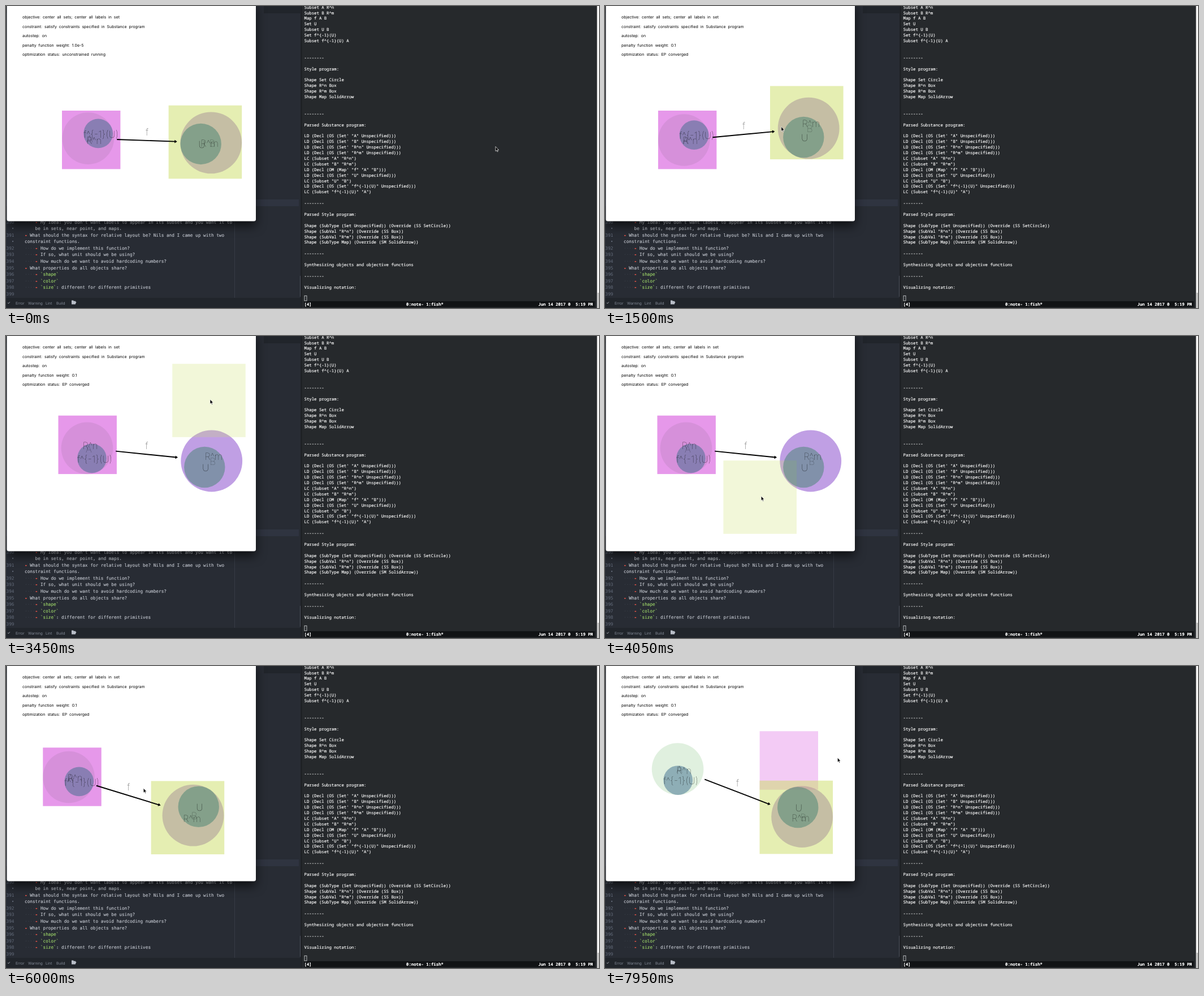
Recreate the animation shown at these times as an HTML page. Size 1049 by 534 pixels, loop 8 s.

```html
<!DOCTYPE html>
<html lang="en">
<head>
<meta charset="utf-8">
<title>Set diagram optimizer</title>
<style>
html, body { margin: 0; width: 100%; height: 100%; overflow: hidden; background: #282c34; }
svg { display: block; width: 1049px; height: 534px; }
text { white-space: pre; text-rendering: geometricPrecision; }
.term { font: 500 7.33px "Noto Sans Mono", monospace; fill: #fff; stroke: #fff; stroke-width: .15; }
.bar { font-weight: 700; }
.code { font: 7.72px "DejaVu Sans Mono", monospace; fill: #c6cad2; stroke: #c6cad2; stroke-width: .12; }
.num { fill: #656d7c; stroke: none; }
.dash { fill: #f0574a; stroke: #f0574a; stroke-width: .7; }
.str { fill: #9fd86a; stroke: #9fd86a; }
.dim { fill: #3d434f; stroke: none; }
.ui { font: 6.6px Inter, sans-serif; fill: #868d9a; }
.info { font: 400 7px Inter, sans-serif; word-spacing: 2px; fill: #000; }
.label { font: 100 17px Inter, sans-serif; fill: #000; text-anchor: middle; }
</style>
</head>
<body>
<svg id="stage" viewBox="0 0 1049 534">
  <defs>
    <clipPath id="inside"><rect x="1.5" y="-8" width="440.5" height="388.5" rx="3.5"/></clipPath>
  </defs>
  <g id="editor"></g>
  <g id="terminal"></g>
  <rect x="1.5" y="-8" width="440.5" height="388.5" rx="3.5" fill="#fff" style="filter:drop-shadow(0 8px 9px rgba(0,0,0,.65))"/>
  <g id="scene" clip-path="url(#inside)"></g>
  <g id="top"></g>
</svg>
<script>
const LOOP = 8000, STEP = 150;
const $ = id => document.getElementById(id);

function set(el, attrs) {
  for (const k in attrs) el.setAttribute(k, attrs[k]);
}
function add(parent, tag, attrs, content) {
  const el = document.createElementNS('http://www.w3.org/2000/svg', tag);
  set(el, attrs);
  if (content !== undefined) el.textContent = content;
  return parent.appendChild(el);
}
const rect = (g, x, y, width, height, fill) => add(g, 'rect', { x, y, width, height, fill });
const write = (g, cls, x, y, s) => add(g, 'text', { class: cls, x, y }, s);

function buildEditor(g) {
  rect(g, 0, 0, 524, 534, '#282c34');
  rect(g, 0, 0, 521, 13, '#21252b');
  rect(g, 442, 0, 14, 13, '#282c34');
  rect(g, 0, 342, 518, 12, '#2f3440');
  rect(g, 404, 354, 1, 162, '#363b45');
  rect(g, 520, 477, 2, 37, '#4b505b');
  const col = 4.646, left = 33;
  // Leading spaces give the indent; lines without a dash are wrapped.
  const lines = [
    "    - My idea: you don't want labels to appear in its subset and you want it to",
    '    be in sets, near point, and maps.',
    '- What should the syntax for relative layout be? Nils and I came up with two',
    'constraint functions.',
    '    - How do we implement this function?',
    '    - If so, what unit should we be using?',
    '    - How much do we want to avoid hardcoding numbers?',
    '- What properties do all objects share?',
    '    - `shape`',
    '    - `color`',
    '    - `size`: different for different primitives',
    ''
  ];
  let number = 390;
  lines.forEach((line, i) => {
    const [, indent, dash, body] = line.match(/^( *)(- )?(.*)$/);
    const y = 384.6 + i * 11.57, x = left + indent.length * col;
    const gutter = dash || !line ? number++ : '•';
    set(write(g, 'code num', 14.5, y, gutter), { 'text-anchor': 'end' });
    if (dash) {
      write(g, 'code dim', left, y, '·'.repeat(indent.length));
      write(g, 'code dash', x, y, '-');
    }
    const row = write(g, 'code', x + (dash ? 2 * col : 0), y, '');
    body.split(/(`\w+`)/).forEach(part =>
      add(row, 'tspan', part[0] === '`' ? { class: 'str' } : {}, part));
  });
  rect(g, 0, 516, 524, 18, '#21252b');
  set(write(g, 'ui', 2, 527, '✓'), { style: 'fill:#c8ccd4' });
  [['Error', 17], ['Warning', 39], ['Lint', 70], ['Build', 89]].forEach(([s, x]) => write(g, 'ui', x, 527.5, s));
  add(g, 'path', { d: 'M116 527.5V520.5h3l1 1.2h3v1.3h1.5l-1.8 4.5z', fill: '#b9bec8' });
}

function buildTerminal(g) {
  rect(g, 521, 0, 528, 534, '#26292c');
  rect(g, 521.5, 0, 2, 534, '#1c1f22');
  rect(g, 1045.5, 0, 3.5, 534, '#f8f8f8');
  rect(g, 1046.3, 507, 2.7, 27, '#c1c1c1');
  const rule = '--------';
  const rows = [
    'Subset A R^n', 'Subset B R^m', 'Map f A B', 'Set U', 'Subset U B', 'Set f^{-1}(U)', 'Subset f^{-1}(U) A',
    '', '', rule, '', 'Style program:', '',
    'Shape Set Circle', 'Shape R^n Box', 'Shape R^m Box', 'Shape Map SolidArrow',
    '', '', rule, '', 'Parsed Substance program:', '',
    ...['A', 'B', 'R^n', 'R^m'].map(s => `LD (Decl (OS (Set' "${s}" Unspecified)))`),
    'LC (Subset "A" "R^n")', 'LC (Subset "B" "R^m")',
    'LD (Decl (OM (Map\' "f" "A" "B")))', 'LD (Decl (OS (Set\' "U" Unspecified)))',
    'LC (Subset "U" "B")', 'LD (Decl (OS (Set\' "f^{-1}(U)" Unspecified)))', 'LC (Subset "f^{-1}(U)" "A")',
    '', rule, '', 'Parsed Style program:', '',
    'Shape (SubType (Set Unspecified)) (Override (SS SetCircle))',
    'Shape (SubVal "R^n") (Override (SS Box))', 'Shape (SubVal "R^m") (Override (SS Box))',
    'Shape (SubType Map) (Override (SM SolidArrow))',
    '', rule, '', 'Synthesizing objects and objective functions', '', rule, '', 'Visualizing notation:'
  ];
  const rowY = n => 4.6 + n * 9.9;
  rows.forEach((s, i) => write(g, 'term', 527.5, rowY(i), s));
  rect(g, 527.5, 522, 514, 10.5, '#111315');
  add(g, 'rect', { x: 528, y: 512.3, width: 4, height: 9, fill: 'none', stroke: '#d8dadb', 'stroke-width': .8 });
  [['[4]', 527.5], ['0:note- 1:fish*', 708], ['Jun 14 2017 0  5:19 PM', 941.5]]
    .forEach(([s, x]) => write(g, 'term bar', x, rowY(53) + .2, s));
}

const size = { A: 45.8, B: 54.4, F: 25.9, U: 36.2, n: 103.4, m: 129.6 };
const mix = (p, q, k) => p.map((v, i) => v + (q[i] - v) * k);
const polar = ([x, y], r, a) => [x + r * Math.cos(a), y + r * Math.sin(a)];
const heading = (p, q) => Math.atan2(q[1] - p[1], q[0] - p[0]);
const shift = (p, x, y) => [p[0] + x, p[1] + y];

// Layouts the optimizer settles in: when it moves, the box centres,
// and the direction (degrees) in which each outer set leans in its box.
const layouts = [
  { move: [0, 0], n: [150.7, 236.7], m: [352.4, 240.6], lean: [205, 7] },
  { move: [1350, 1500], n: [145.7, 236.7], m: [356.8, 206.3], lean: [177, 71] },
  { move: [2850, 3000], n: [144.2, 192.4], m: [359.5, 211.5], lean: [97, 66] },
  { move: [4050, 4500], n: [141.5, 194.2], m: [347, 233.5], lean: [146, -12] },
  { move: [5400, 5700], n: [117, 196], m: [321.4, 268.2], lean: [175, -23] },
  { move: [6900, 7800], n: [134.5, 183.2], m: [338.3, 267.5], lean: [190, -5] }
];

// An inner set stays put until its outer set drags it along.
function keepInside(inner, outer, room) {
  return Math.hypot(inner[0] - outer[0], inner[1] - outer[1]) <= room
    ? inner : polar(outer, room, heading(outer, inner));
}
let F = [164, 225], U = [344, 244];
for (const p of layouts) {
  const [a, b] = p.lean.map(d => d * Math.PI / 180);
  p.A = polar(p.n, 6, a);
  p.B = polar(p.m, 10.4, b);
  p.F = F = keepInside(F, p.A, size.A - size.F);
  p.U = U = keepInside(U, p.B, size.B - size.U);
}
function settled(name, t) {
  let i = layouts.length - 1;
  while (i && t < layouts[i].move[0]) i--;
  if (!i) return layouts[0][name];
  const [t0, t1] = layouts[i].move;
  return mix(layouts[i - 1][name], layouts[i][name], Math.min(1, (t - t0) / (t1 - t0)));
}

// Mouse drags: which box, pointer offset from its centre, and stops [time, x, y].
const drags = [
  { box: 'm', grip: [-45, 7], from: 900, to: 1500, stops: [[1350, 355, 80]] },
  { box: 'n', grip: [19, 62], from: 1800, to: 3000, stops: [[2400, 143, 110], [2700, 142, 123.7]] },
  { box: 'm', grip: [2, -2], from: 3150, to: 5700, stops: [[3450, 359, 114], [4050, 274.2, 285], [4500, 253, 285], [5400, 141, 342]] },
  { box: 'n', grip: [86, -5], from: 6150, to: 8250, stops: [[6600, 152, 118], [6900, 221.2, 143.2], [7950, 325.3, 167]] }
];
function along(stops, t) {
  const i = stops.findIndex(s => s[0] > t);
  if (i <= 0) return stops[i ? stops.length - 1 : 0].slice(1);
  const [t0, ...p] = stops[i - 1], [t1, ...q] = stops[i];
  return mix(p, q, (t - t0) / (t1 - t0));
}
// The pointer glides from each drop to the next grab.
const pointer = [[450, 866, 248.5]];
for (const d of drags) {
  d.path = [[d.from, ...settled(d.box, d.from)], ...d.stops, [d.to, ...settled(d.box, d.to)]];
  pointer.push(...d.path.map(([t, x, y]) => [t, ...shift([x, y], ...d.grip)]));
}

buildEditor($('editor'));
buildTerminal($('terminal'));

const scene = $('scene');
const circle = (name, fill) => add(scene, 'circle', { r: size[name], fill, 'fill-opacity': .5 });
const box = (name, fill) => add(scene, 'rect', { width: size[name], height: size[name], fill });
const label = (s, opacity) => add(scene, 'text', { class: 'label', opacity }, s);

const discs = { A: circle('A', '#c1e1bf'), B: circle('B', '#8141c9') };
const boxes = { n: box('n', '#cd33d5'), m: box('m', '#cbdd67') };
Object.assign(discs, { U: circle('U', '#448472'), F: circle('F', '#3e6f8e') });
const shaft = add(scene, 'line', { stroke: '#000', 'stroke-width': 1.9 });
const head = add(scene, 'path', { d: 'M0 0L-4.5 -2.8V2.8Z' });
const labels = {
  A: label('A', .5), B: label('B', .45), n: label('R^n', .75), m: label('R^m', .7),
  U: label('U', .85), F: label('f^{-1}(U)', .8), f: label('f', .8)
};
const offset = { A: [3, 1], B: [2, 1], n: [5, 1.3], m: [7.7, 1.7], U: [1.7, 1], F: [5, 1] };
const info = ['objective: center all sets; center all labels in set',
  'constraint: satisfy constraints specified in Substance program',
  'autostep: on', '', ''].map((s, i) => write(scene, 'info', 29, 22.4 + i * 16.5, s));
const cursor = add($('top'), 'path', {
  d: 'M0 0V8.2L1.9 6.5L3.1 9.3L4.4 8.7L3.2 6H5.6Z', fill: '#000', stroke: '#fff', 'stroke-width': .7
});

const place = (el, [x, y]) => set(el, { x, y: y + 6.2 });

function draw(t) {
  for (const k in discs) {
    const [cx, cy] = settled(k, t);
    set(discs[k], { cx, cy });
  }
  for (const k in boxes) {
    const drag = drags.find(d => d.box === k && t >= d.from && t < d.to);
    const [x, y] = drag ? along(drag.path, t) : settled(k, t);
    set(boxes[k], { x: x - size[k] / 2, y: y - size[k] / 2, 'fill-opacity': drag ? .25 : .5 });
  }

  const a = settled('A', t), b = settled('B', t), angle = heading(a, b);
  const [x1, y1] = polar(a, 51, angle), [x2, y2] = polar(b, -60, angle);
  const [ex, ey] = polar(b, -63, angle);
  set(shaft, { x1, y1, x2: ex, y2: ey });
  set(head, { transform: `translate(${x2} ${y2}) rotate(${angle * 180 / Math.PI})` });

  place(labels.f, [(x1 + x2) / 2, (y1 + y2) / 2 - 15.5]);
  for (const k in offset) place(labels[k], shift(settled(k, t), ...offset[k]));

  const done = t >= 600;
  info[3].textContent = 'penalty function weight: ' + (done ? '0.1' : '1.0e-5');
  info[4].textContent = 'optimization status: ' + (done ? 'EP converged' : 'unconstrained running');
  set(cursor, { transform: `translate(${along(pointer, t)})` });
}

let shown = -1;
function tick() {
  const step = Math.floor(performance.now() % LOOP / STEP);
  if (step !== shown) draw((shown = step) * STEP);
  requestAnimationFrame(tick);
}
tick();
</script>
</body>
</html>
```
